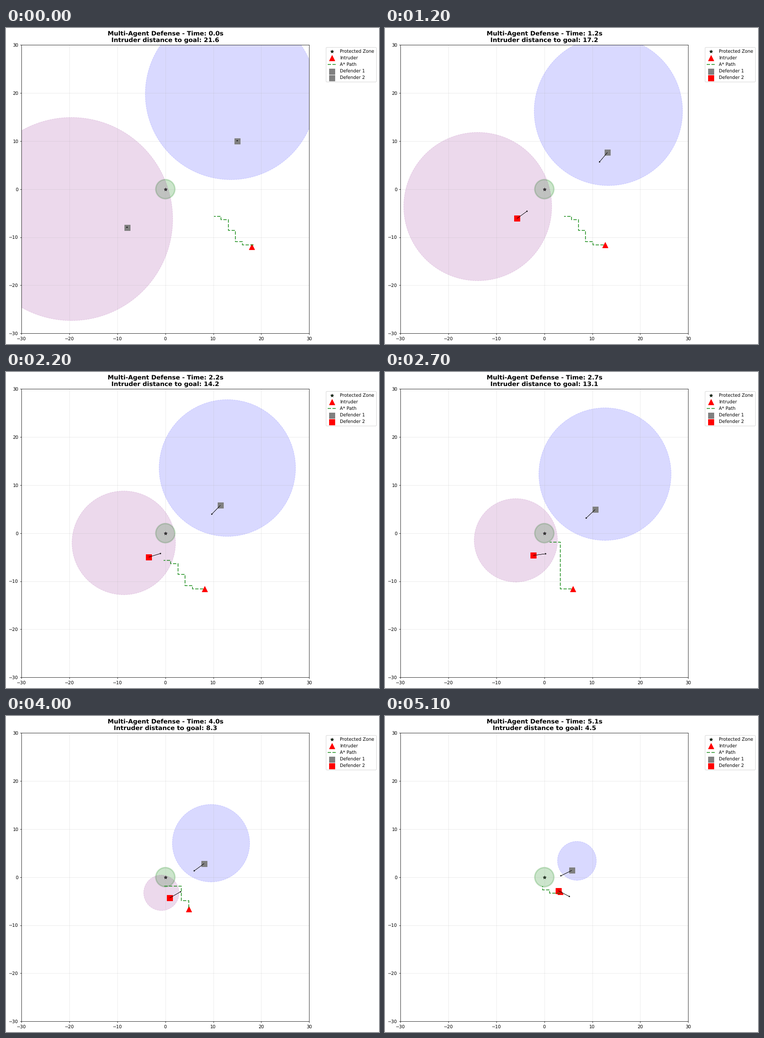
Recreate the animation shown at these times as a matplotlib script. Size 800 by 676 pixels, loop 5.2 s.

```python
import numpy as np
import matplotlib.pyplot as plt
from matplotlib.animation import FuncAnimation
from matplotlib.patches import Circle

W, H, DPI = 800, 676, 69
FRAMES, DT = 52, 0.1
V_INTRUDER, V_DEFENDER = 4.5, 2.5
RATIO = V_DEFENDER / V_INTRUDER
CELL, ZONE = 0.75, 2.0
GUARD = 0.3          # where defender 1 blocks the line from goal to intruder
MAX_MOVES = 19       # length of the shown part of the plan

# Corners of the routes walked at constant speed
INTRUDER_ROUTE = [
    (18, -12), (17.4, -11.625), (5.1, -11.625), (4.875, -11.1),
    (4.875, -5), (4.6, -4.875), (3.5, -4.875), (3.375, -4.7), (3.375, 0)]
CHASER_ROUTE = [
    (-8, -8), (-5.7, -6.1), (-4.4, -5.27), (-2.27, -4.62),
    (-1.05, -4.67), (0.9, -4.35), (2.6, -2.65), (3.02, -2.87)]


def walk(route, speed, t):
    """Position after time t along a polyline."""
    xy = np.array(route)
    length = np.r_[0, np.cumsum(np.hypot(*np.diff(xy, axis=0).T))]
    return np.array([np.interp(speed * t, length, c) for c in xy.T])


def unit(v):
    return v / np.hypot(*v)


def intruder_at(t):
    return walk(INTRUDER_ROUTE, V_INTRUDER, t)


def guard_track():
    """Steer towards a point between the goal and the intruder."""
    pos, vel = np.zeros((FRAMES, 2)), np.zeros((FRAMES, 2))
    pos[0] = 15, 10
    for n in range(1, FRAMES):
        aim = GUARD * intruder_at(n * DT)
        vel[n] = V_DEFENDER * unit(aim - pos[n - 1])
        pos[n] = pos[n - 1] + vel[n] * DT
    return pos, vel


def chase_track():
    pos, vel = np.zeros((FRAMES, 2)), np.zeros((FRAMES, 2))
    for n in range(FRAMES):
        before, pos[n], after = (walk(CHASER_ROUTE, V_DEFENDER, n * DT + d)
                                 for d in (-0.15, 0, 0.15))
        if n:
            vel[n] = V_DEFENDER * unit(after - before)
    return pos, vel


def planned_path(pos):
    """Grid path from the intruder's cell: a staircase, or a tall column."""
    cell = np.floor(pos / CELL).astype(int)
    col, row = cell
    if 4 < col < 10:
        climb = 2 if col < 7 else 0
        moves = ("U" * climb + "L" * (col - 4)
                 + "U" * (-3 - row - climb) + "L" * 5)
    else:
        moves = "LLLU" + "LLUUU" * 2 + "LLULL"
    cells = [cell]
    for m in moves[:MAX_MOVES]:
        cells.append(cells[-1] + ((-1, 0) if m == "L" else (0, 1)))
        if cells[-1][0] < 0 and cells[-1][1] >= -3:
            break
    return (np.array(cells).T + 0.5) * CELL


TRACKS = [guard_track(), chase_track()]

plt.rcParams["text.hinting"] = "none"
fig = plt.figure(figsize=(W / DPI, H / DPI), dpi=DPI, facecolor="white")
SIDE = 616.7
ax = fig.add_axes([33.4 / W, 1 - 653.1 / H, SIDE / W, SIDE / H])
ax.set(xlim=(-30, 30), ylim=(-30, 30))
ax.grid(True, alpha=0.3)

ax.add_patch(Circle((0, 0), ZONE, color="green", alpha=0.2, linewidth=3))
ax.scatter(0, 0, s=50, marker="*", c="darkgreen", edgecolors="black",
           linewidths=1, label="Protected Zone")
intruder = ax.scatter(0, 0, s=150, marker="^", c="red", label="Intruder")
path, = ax.plot([], [], "g--", linewidth=2, alpha=0.7, label="A* Path")

squares, regions, arrows = [], [], []
for i, tint in enumerate(("blue", "purple"), 1):
    regions.append(ax.add_patch(
        Circle((0, 0), 1, color=tint, alpha=0.15, linestyle="--")))
    squares.append(ax.scatter(0, 0, s=150, marker="s", c="gray",
                              label=f"Defender {i}"))
    arrows.append(ax.arrow(0, 0, 0, 0, head_width=0.3, head_length=0.2,
                           fc="black", ec="black", linewidth=0.5))

legend = ax.legend(loc="upper left", bbox_to_anchor=(1.05, 1), fontsize=10,
                   labelspacing=0.47)
title = ax.set_title("", fontsize=14, fontweight="bold")


def update(n):
    t = n * DT
    pos = intruder_at(t)
    intruder.set_offsets(pos)
    path.set_data(*planned_path(pos))

    for (track, vel), square, region, arrow in zip(
            TRACKS, squares, regions, arrows):
        p, v = track[n], vel[n]
        square.set_offsets(p)
        # Apollonius circle: points the defender reaches first
        gap = p - pos
        region.center = p + gap * RATIO**2 / (1 - RATIO**2)
        region.radius = np.hypot(*gap) * RATIO / (1 - RATIO**2)
        arrow.set_data(x=p[0], y=p[1], dx=v[0], dy=v[1])

    chaser = "red" if n else "gray"
    squares[1].set_color(chaser)
    legend.legend_handles[4].set_color(chaser)
    title.set_text(f"Multi-Agent Defense - Time: {t:.1f}s\n"
                   f"Intruder distance to goal: {np.hypot(*pos):.1f}")
    return []


anim = FuncAnimation(fig, update, frames=FRAMES, interval=100,
                     repeat=True, repeat_delay=0, blit=False)
plt.show()
```
